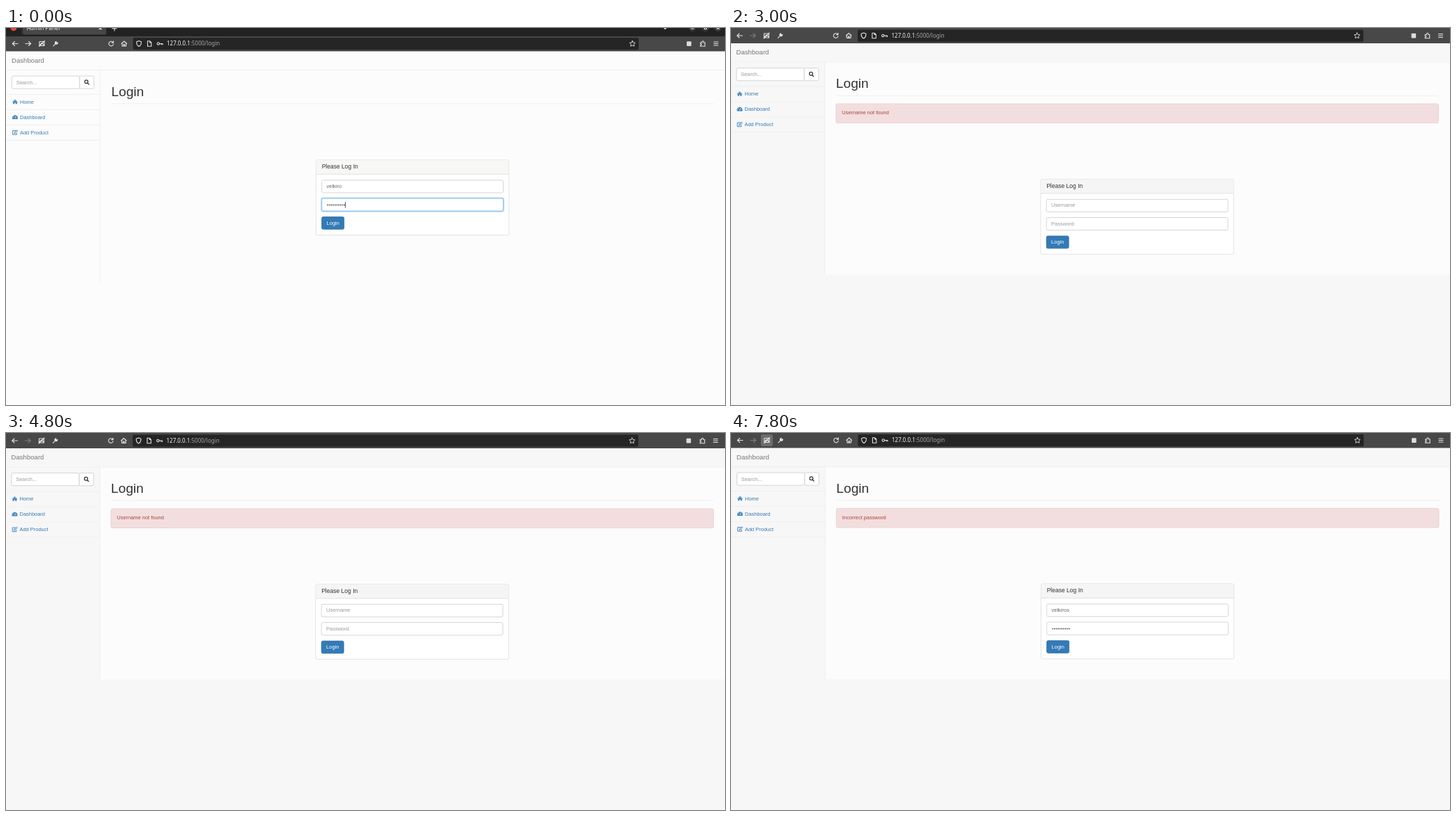
Recreate the animation shown at these times as an HTML page. Size 1033 by 542 pixels, loop 9000 ms.

```html
<!DOCTYPE html>
<html lang="en">
<head>
<meta charset="utf-8">
<title>Login page</title>
<style>
  html, body { margin: 0; width: 100%; height: 100%; overflow: hidden; background: #fcfcfc; }
  svg { display: block; width: 1033px; height: 542px; font-family: "Liberation Sans", Arial, sans-serif; }
  .ui { font-family: "Noto Sans", sans-serif; }
  .line { fill: none; stroke: #e4e4e4; stroke-width: 1.1; stroke-linecap: round; stroke-linejoin: round; }
</style>
</head>
<body>
<svg id="stage" viewBox="0 0 1033 542"></svg>
<script>
const stage = document.getElementById('stage');
const SCENE_MS = 3000;
const BODY = 7.467;
const LINK = '#337ab7';

// dx, dy: page scroll; push: room taken by the alert above the form
const scenes = [
  { dx: 0, dy: 0, push: 0, bg: '#fcfcfc', tabs: true, forward: true, user: 'velkiro', secret: true, focus: true },
  { dx: -.5, dy: -11.5, push: 39, bg: '#f7f7f7', alert: 'Username not found' },
  { dx: 0, dy: -12, push: 39, bg: '#f7f7f7', alert: 'Incorrect password', user: 'velkiros', secret: true, pressed: true },
];

const rect = (x, y, w, h, fill, attrs = '') =>
  `<rect x="${x}" y="${y}" width="${w}" height="${h}" fill="${fill}" ${attrs}/>`;
const box = (x, y, w, h, fill, stroke, r = 2) =>
  rect(x, y, w, h, fill, `rx="${r}" stroke="${stroke}" stroke-width=".8"`);
const text = (x, y, size, fill, str, attrs = '') =>
  `<text x="${x}" y="${y}" font-size="${size}" fill="${fill}" ${attrs}>${str}</text>`;
const path = (d, attrs = 'class="line"') => `<path d="${d}" ${attrs}/>`;
const rule = (x1, x2, y, color = '#ececec') => path(`M${x1} ${y}H${x2}`, `stroke="${color}" stroke-width=".8"`);
const at = (x, y, content) => `<g transform="translate(${x} ${y})">${content}</g>`;

const starPath = r => Array.from({ length: 10 }, (_, i) => {
  const a = -Math.PI / 2 + i * Math.PI / 5, d = i % 2 ? r * .5 : r;
  return (i ? 'L' : 'M') + (d * Math.cos(a)).toFixed(2) + ' ' + (d * Math.sin(a)).toFixed(2);
}).join('') + 'Z';

function tabStrip() {
  const button = x => `<circle cx="${x}" cy="0" r="5" fill="#3a3a3a"/>`;
  return rect(0, 0, 1033, 12, '#222') +
    rect(24, -6, 120, 15.5, '#474747', 'rx="2"') +
    rect(22, 0, .8, 10, '#3c3c3c') +
    '<circle cx="11" cy="0" r="4.3" fill="#e0483c"/>' +
    text(30, 3, 8, '#eee', 'Admin Panel', 'class="ui"') +
    path('M134 -1l3 3m0 -3l-3 3M152.5 .8h6.5m-3.2 -3.2v6.4M945 -.5l2 2 2 -2') +
    button(986) + button(1005) + button(1023) +
    path('M984.5 1h3.5M1003.5 -1h3v2.5h-3zM1021.5 -1.5l3 3m0 -3l-3 3');
}

function toolbar(s) {
  const icon = (x, d, extra = '') => at(x, 22.5, path(d) + extra);
  const arrow = 'M4 0H-3.5M-.5 -3L-3.7 0L-.5 3';
  return rect(-1, 11, 1035, 22.5, '#484848') +
    rect(182.5, 14, 726.5, 17.3, '#252525', 'rx="2"') +
    (s.pressed ? rect(43, 14, 17, 17, '#6d6d6d', 'rx="2"') : '') +
    icon(13, arrow) +
    `<g opacity="${s.forward ? 1 : .35}">${at(32, 22.5, `<g transform="scale(-1 1)">${path(arrow)}</g>`)}</g>` +
    icon(51.5, 'M-3.5 -3H3.5V3H-3.5ZM-3 2L0 -1L3 2M-4 4L4 -4') +
    icon(71, 'M-3 3.3L.8 -.5', path('M3.7 -2.3A2.5 2.5 0 1 1 1.7 -3.7L1.6 -1.8Z', 'fill="#e4e4e4"')) +
    icon(151, 'M2.8 -1.8A3.3 3.3 0 1 0 3.3 .8M3.3 -3.7V-1.4H1') +
    icon(169.7, 'M-3.8 0L0 -3.5L3.8 0M-2.8 -.7V3.5H2.8V-.7M-.7 3.3V1H.7V3.3') +
    icon(191, 'M0 -4L3.4 -2.8C3.5 1 2 3 0 4C-2 3 -3.5 1 -3.4 -2.8Z') +
    icon(206, 'M-2.6 -3.7H.7L2.8 -1.5V3.7H-2.6ZM.7 -3.5V-1.5H2.6') +
    icon(221, 'M-.5 0H4V1.5M2.3 0V1.2', '<circle cx="-2.2" r="1.7" class="line"/>') +
    text(231, 25.4, 8, '#f5f5f5',
      '127.0.0.1<tspan fill="#a5a5a5" font-weight="400">:5000/login</tspan>', 'class="ui" font-weight="500"') +
    at(900, 22.7, path(starPath(4.3), 'class="line" style="stroke-width:.9"')) +
    rect(978, 19.3, 6.6, 6.6, '#dcdcdc', 'rx="1"') +
    icon(1001, 'M-3.3 -1.5H-1V-2.5A1.2 1.2 0 0 1 1.4 -2.5V-1.5H3.2V3.7H-3.3V2H-2.3A1 1 0 0 0 -2.3 .3H-3.3Z') +
    icon(1020, 'M-3 -2.5H3M-3 0H3M-3 2.5H3');
}

function sidebar() {
  const home = path('M-4 .2L0 -3.4L4 .2L3.4 .8L0 -2.2L-3.4 .8ZM-2.8 .8L0 -1.6L2.8 .8V3H.8V1H-.8V3H-2.8Z', `fill="${LINK}"`);
  const gauge = path('M-3.6 2.8A4 4 0 1 1 3.6 2.8Z', `fill="${LINK}"`) +
    path('M0 1.6L.9 -1.2M-2.5 .6h.1M-1.7 -1.4h.1M2.5 .6h.1', 'stroke="#fff" stroke-width=".9" stroke-linecap="round"');
  const edit = path('M1.2 -2.6H-3.3V3H2.4V.8M-1 1.2L-.7 -.3L2.8 -3.4L3.8 -2.3L.4 .9Z',
    `fill="none" stroke="${LINK}" stroke-width=".9"`);
  const items = [['Home', home], ['Dashboard', gauge], ['Add Product', edit]];
  return rule(0, 135, 95.5) +
    box(8.4, 69, 97.4, 18.2, '#fff', '#ccc') +
    box(105.8, 69, 20.6, 18.2, '#fff', '#ccc') +
    text(14.7, 80.5, BODY, '#999', 'Search...') +
    '<circle cx="115.4" cy="77.3" r="2.4" fill="none" stroke="#333" stroke-width="1.2"/>' +
    path('M117.2 79.2L119 81', 'stroke="#333" stroke-width="1.4" stroke-linecap="round"') +
    items.map(([label, icon], i) => {
      const y = 106.2 + i * 22;
      return at(13, y, icon) + text(20, y + 2.6, BODY, LINK, label) + rule(0, 135, y + 11.3);
    }).join('');
}

function form(s) {
  const field = (y, focus) => box(453.7, y, 260.7, 18.1, '#fff', focus ? '#66afe9' : '#ccc');
  const dots = Array.from({ length: 10 }, (_, i) => `<circle cx="${462.2 + i * 2.65}" cy="254.4" r=".95"/>`).join('');
  const glow = s.focus
    ? [3.6, 2.4].map(w => rect(453.7, 245, 260.7, 18.1, 'none', `rx="2" stroke="#66afe9" stroke-opacity=".25" stroke-width="${w}"`)).join('')
    : '';
  return box(445.4, 189.8, 277.2, 108, '#fff', '#ddd') +
    rect(445.8, 190.2, 276.4, 20, s.focus ? '#f7f8f6' : '#f5f5f5', 'rx="1.5"') +
    rule(445.4, 722.6, 210.3, '#ddd') +
    text(453.7, 202, 8.533, '#333', 'Please Log In') +
    field(218.8) + glow + field(245, s.focus) +
    text(460.6, 229.9, BODY, s.user ? '#666' : '#999', s.user || 'Username') +
    (s.secret ? `<g fill="#555">${dots}</g>` : text(460.6, 256.2, BODY, '#999', 'Password')) +
    (s.focus ? rect(487.2, 250, .8, 8.6, '#333') : '') +
    box(453.7, 271.5, 32, 17.8, LINK, '#2e6da4') +
    text(460.6, 282.8, BODY, '#fff', 'Login');
}

function page(s) {
  const alert = s.alert
    ? box(151.4, 120.4, 865.6, 27.6, '#f2dede', '#ebccd1') + text(159.8, 135.6, BODY, '#a94442', s.alert)
    : '';
  return rect(135.5, 60.5, 900, 305.5, '#fcfcfc') +
    rule(-1, 1034, 60.5) +
    path('M135.3 60.5V366', 'stroke="#eee" stroke-width=".8"') +
    text(8, 49.8, 9.6, '#777', 'Dashboard') +
    sidebar() +
    text(151.3, 97.5, 19.2, '#333', 'Login') +
    rule(151.3, 1017, 108.8) +
    alert + at(0, s.push, form(s));
}

const render = s => rect(0, 0, 1033, 542, s.bg) +
  at(s.dx, s.dy, page(s) + toolbar(s)) + (s.tabs ? tabStrip() : '');

let shown = -1;
function tick() {
  const index = Math.floor(performance.now() / SCENE_MS) % scenes.length;
  if (index !== shown) {
    shown = index;
    stage.innerHTML = render(scenes[index]);
  }
  requestAnimationFrame(tick);
}
tick();
</script>
</body>
</html>
```
